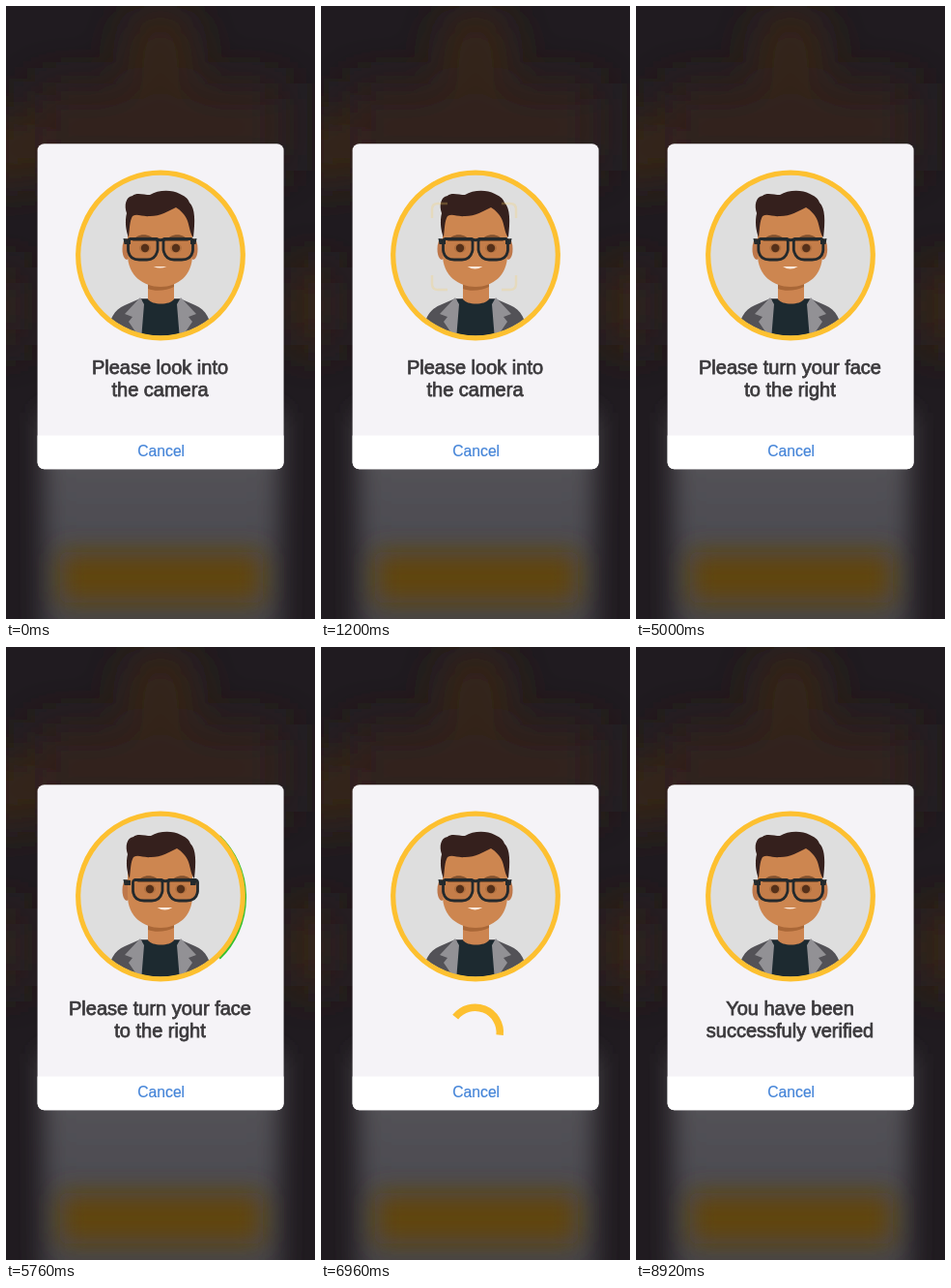
These frames come from a looping animation (320x633 px, 8.96 s). An HTML page:

```html
<!DOCTYPE html>
<html lang="en">
<head>
<meta charset="utf-8">
<title>Face check</title>
<style>
html, body { margin: 0; width: 100%; height: 100%; overflow: hidden; background: #201b20; }
svg { display: block; width: 100vw; height: 100vh; }
text { font-family: "Liberation Sans", Arial, sans-serif; text-anchor: middle; font-variant-ligatures: none; }
.msg { font-size: 20px; fill: #3b393c; stroke: #3b393c; stroke-width: .75; }
</style>
</head>
<body>
<svg viewBox="0 0 320 633" preserveAspectRatio="none">
  <defs>
    <filter id="soft" x="-60%" y="-60%" width="220%" height="220%"><feGaussianBlur stdDeviation="13"/></filter>
    <filter id="wide" x="-50%" y="-50%" width="200%" height="200%"><feGaussianBlur stdDeviation="24"/></filter>
    <clipPath id="disc"><circle cx="160" cy="257.5" r="83"/></clipPath>
    <linearGradient id="panel" x1="0" y1="0" x2="0" y2="1">
      <stop offset=".2" stop-color="#535257"/><stop offset="1" stop-color="#454348"/>
    </linearGradient>
  </defs>

  <rect width="320" height="633" fill="#201b20"/>
  <g filter="url(#wide)">
    <rect x="30" y="80" width="260" height="90" fill="#32221a"/>
    <rect x="-30" y="120" width="60" height="60" fill="#3a2816"/>
    <rect x="295" y="270" width="60" height="80" fill="#3a2816"/>
    <rect x="-30" y="270" width="50" height="80" fill="#30211a"/>
    <ellipse cx="160" cy="42" rx="34" ry="42" fill="#3a2813"/>
  </g>
  <rect x="38" y="420" width="246" height="240" fill="url(#panel)" filter="url(#soft)"/>
  <rect x="56" y="564" width="210" height="52" rx="8" fill="#604510" filter="url(#soft)"/>

  <rect x="32.600" y="142.200" width="255" height="336" rx="7" fill="#f5f3f7"/>
  <path d="M32.600 443.500H287.600V471.200a7 7 0 0 1-7 7H39.600a7 7 0 0 1-7-7Z" fill="#fff"/>
  <text x="160.700" y="465.200" font-size="15.700" fill="#4484d8" stroke="#4484d8" stroke-width=".2">Cancel</text>

  <path id="arc" fill="none" stroke="#35c02f" stroke-width="8"/>
  <circle cx="160" cy="257.500" r="85.500" fill="#dedede"/>

  <g clip-path="url(#disc)">
    <path d="M104 345C106 325 111 314 123 309L139 302H180L196 309C208 314 213 325 215 345Z" fill="#535257"/>
    <path d="M141 303H180L182 345H139Z" fill="#1d2a30"/>
    <path d="M139 301L123 318L131 321L127 326L140 345L143 308ZM181 301L197 318L189 321L193 326L180 345L177 308Z" fill="#929195"/>
    <path d="M147 280H174V303C171 306 167 307.500 160.500 307.500S150 306 147 303Z" fill="#cc8450"/>
    <path d="M147 286H174V290C167 294 154 295 147 292Z" fill="#a96737"/>
    <ellipse cx="125" cy="251" rx="4.500" ry="11" fill="#be774a"/>
    <ellipse id="ear" cx="194" cy="251" rx="4.500" ry="11" fill="#be774a"/>
    <path d="M126 215C135 200 183 200 193 215V257C193 278 178 290 160 290S126 278 126 257Z" fill="#cd8650"/>
    <path id="hair" d="M125 214C122 206 124 197 131 196C135 192 143 195 149 195C157 190 171 189 180 194C187 197 189 200 190 203C196 209 196 222 194 239C191 236 190 228 188 222C186 216 181 211 176 208C168 212 160 217 149 217C141 218 136 214 131 217C128 222 128 230 127 239C124 232 123 222 125 214Z" fill="#35201d"/>
    <g id="face">
      <g fill="#c47d49" stroke="#23292c" stroke-width="2.800">
        <path d="M129 240.500H153Q157.500 240.500 157 245V252Q155 262 146 262H138Q127.500 262 126.500 252V245Q126 240.500 129 240.500Z"/>
        <path d="M167 240.500H191Q194 240.500 193.500 245V252Q192.500 262 182 262H174Q165 262 163 252V245Q162.500 240.500 167 240.500Z"/>
      </g>
      <path d="M131 243C135 234 150 234 155 243ZM165 243C170 234 185 234 189 243Z" fill="#6f4426" opacity=".8"/>
      <path d="M128 240.500H156Q160 243 164 240.500H192" fill="none" stroke="#23292c" stroke-width="3"/>
      <g id="eyes"></g>
      <path id="mouth" fill="#fbe9dc"/>
    </g>
    <path d="M121.500 240L129 241V246L122.500 246ZM197.500 240L191 241V246L196.500 246Z" fill="#23292c"/>
    <path id="frame" d="M115 219V210Q115 204 121 204H131M187 204H196Q202 204 202 210V219M202 278V287Q202 293 196 293H187M131 293H121Q115 293 115 287V278" fill="none" stroke="#f7cf63" stroke-width="2.500"/>
  </g>
  <circle cx="160" cy="257.500" r="85.300" fill="none" stroke="#fdc030" stroke-width="5.200"/>

  <g id="msgs"></g>
  <path id="spin" fill="none" stroke="#fdc030" stroke-width="7.500"/>
</svg>
<script>
const LOOP = 8960, STEP = 40;
const NS = "http://www.w3.org/2000/svg";
const $ = id => document.getElementById(id);
const make = (tag, attrs, parent) => {
  const el = document.createElementNS(NS, tag);
  for (const k in attrs) el.setAttribute(k, attrs[k]);
  return parent.appendChild(el);
};
const ramp = (t, a, b) => Math.max(0, Math.min(1, (t - a) / (b - a)));
const ease = (t, a, b) => { const x = ramp(t, a, b); return x * x * (3 - 2 * x); };

// text lines, start, fade-in length, end, fade-out length
const PERFECT = ["Perfect! You got it"];
const MESSAGES = [
  [["Please look into", "the camera"], 0, 0, 2000, 40],
  [PERFECT, 2040, 120, 2720, 0],
  [["Please blink three times", "into the camera"], 2720, 0, 3720, 40],
  [PERFECT, 3800, 320, 4560, 40],
  [["Please turn your face", "to the right"], 4600, 40, 5760, 80],
  [PERFECT, 5880, 160, 6720, 120],
  [["You have been", "successfuly verified"], 8320, 120, LOOP, 0]
].map(([lines, start, fadeIn, end, fadeOut]) => {
  const el = make("g", { class: "msg" }, $("msgs"));
  lines.forEach((s, i) => {
    make("text", { x: 159.5, y: 380 + 23 * i }, el).textContent = s;
  });
  return { el, start, fadeIn, end, fadeOut };
});

const eyes = [144, 176].map(x => ({
  rim: make("ellipse", { cx: x, cy: 250, rx: 6, fill: "#b0703f" }, $("eyes")),
  iris: make("ellipse", { cx: x, cy: 250, rx: 4.2, fill: "#553019" }, $("eyes"))
}));
const BLINKS = [2720, 3000, 3280];

function arcPath(cx, cy, r, from, to) {
  const at = d => {
    const a = d * Math.PI / 180;
    return (cx + r * Math.cos(a)).toFixed(2) + " " + (cy + r * Math.sin(a)).toFixed(2);
  };
  return `M${at(from)}A${r} ${r} 0 ${to - from > 180 ? 1 : 0} 1 ${at(to)}`;
}

function openness(t) {
  const start = BLINKS.find(b => t >= b && t < b + 120);
  if (start === undefined) return 1;
  return [0.5, 0.15, 0.5][Math.floor((t - start) / STEP)];
}

function draw(t) {
  for (const m of MESSAGES) {
    const a = m.fadeIn ? ramp(t, m.start - STEP, m.start + m.fadeIn) : +(t >= m.start);
    const b = m.fadeOut ? 1 - ramp(t, m.end, m.end + m.fadeOut) : +(t < m.end);
    m.el.setAttribute("opacity", a * b);
  }

  const pulse = t < 1980 ? Math.sin(Math.PI * t / 660) ** 2 : 0;
  $("frame").setAttribute("opacity", 0.9 * pulse);

  const turn = ease(t, 4880, 5640) - ease(t, 6040, 6760);
  $("face").setAttribute("transform", `translate(${5 * turn} 0)`);
  $("hair").setAttribute("transform", `translate(${turn} 0)`);
  $("ear").setAttribute("cx", 194 - 5 * turn);

  const open = openness(t);
  for (const e of eyes) {
    e.rim.setAttribute("ry", 4.8 * open);
    e.iris.setAttribute("ry", 4.2 * open);
  }

  const smile = ease(t, 200, 1100) - ease(t, 6800, 7700);
  const w = 6.8 + smile, h = 1.5 + smile;
  $("mouth").setAttribute("d", `M${159.5 - w} 269H${159.5 + w}Q159.500 ${269 + 2 * h} ${159.5 - w} 269Z`);

  const out = ease(t, 5700, 5900) - ease(t, 6700, 6860);
  $("arc").setAttribute("d", arcPath(160, 258.5, 83 + 9.5 * out, -46, 46));
  $("arc").setAttribute("opacity", out > 0 ? 1 : 0);

  const angle = 146 + (t - 7760) * 0.36;
  $("spin").setAttribute("d", arcPath(159.5, 398, 25.8, angle, angle + 148));
  $("spin").setAttribute("opacity", ramp(t, 6840, 6960) * (1 - ramp(t, 8200, 8300)));
}

let origin;
function tick(now) {
  if (origin === undefined) origin = now;
  draw(Math.floor(((now - origin) % LOOP) / STEP) * STEP);
  requestAnimationFrame(tick);
}
draw(0);
requestAnimationFrame(tick);
</script>
</body>
</html>
```
